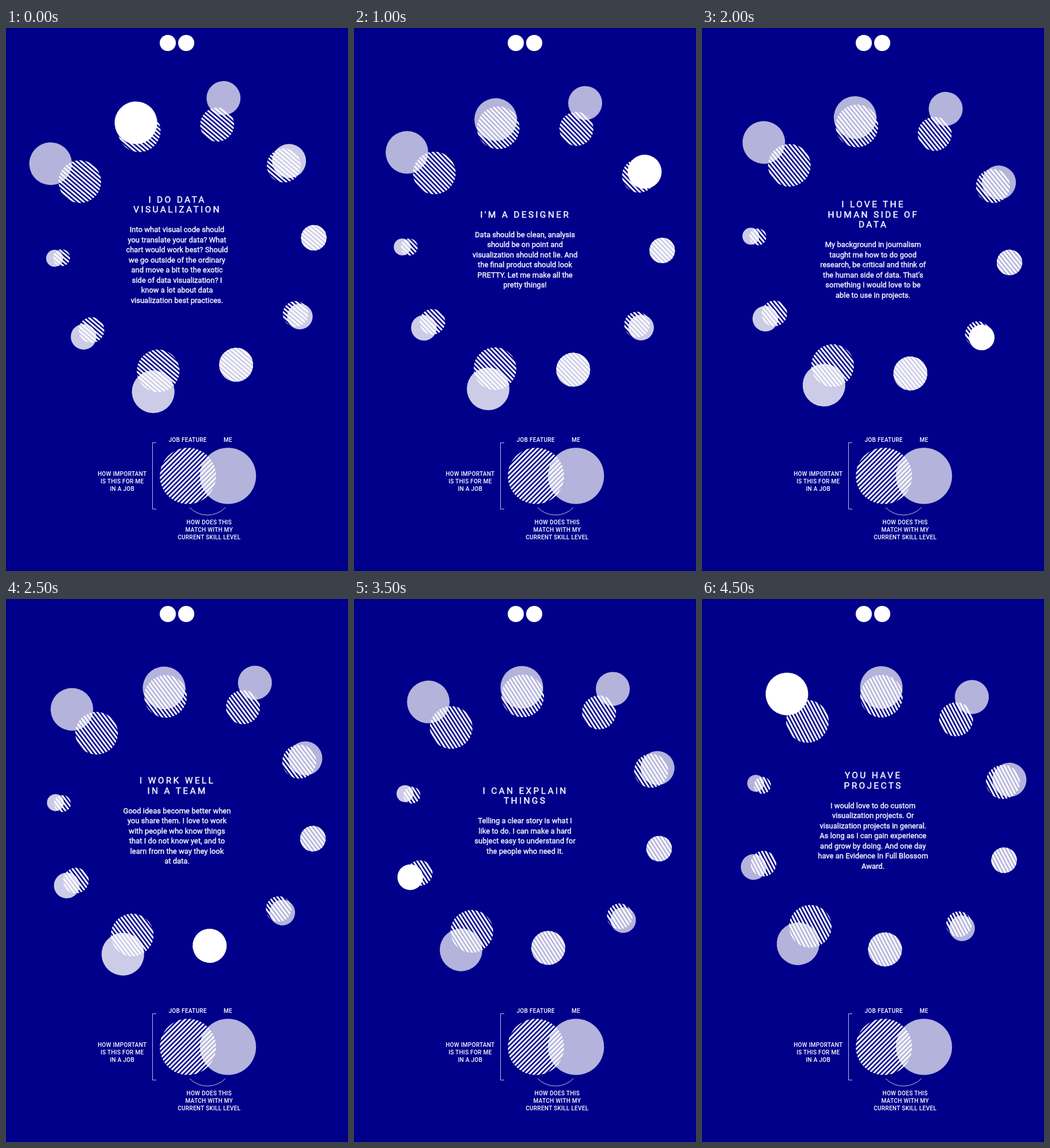
An HTML page for the animation above (5 s loop, 594 px wide and 942 px high).

```html
<!DOCTYPE html>
<html lang="en">
<head>
<meta charset="utf-8">
<title>Job features</title>
<style>
  html, body { margin: 0; width: 100%; height: 100%; overflow: hidden; background: #00008b; }
  svg { display: block; width: 100%; height: 100%; }
  text { fill: #fff; font-family: Roboto, sans-serif; text-anchor: middle; }
  .title { font-size: 15.5px; letter-spacing: 3.3px; stroke: #fff; stroke-width: .4; }
  .body { font-size: 13px; stroke: #fff; stroke-width: .35; }
  .label { font-size: 10px; font-weight: 500; letter-spacing: .3px; }
  .thin { fill: none; stroke: #fff; stroke-opacity: .75; }
</style>
</head>
<body>
<svg id="stage" viewBox="0 0 594 942">
  <defs>
    <pattern id="stripes" y="-1.5" width="5.66" height="5.66" patternUnits="userSpaceOnUse" patternTransform="rotate(45)">
      <rect width="5.66" height="3" fill="#fff"/>
    </pattern>
    <pattern id="legendStripes" y="-1.5" width="5.66" height="5.66" patternUnits="userSpaceOnUse" patternTransform="rotate(-45)">
      <rect width="5.66" height="3" fill="#fff"/>
    </pattern>
  </defs>
  <rect width="594" height="942" fill="#00008b"/>
  <circle cx="281" cy="26" r="14" fill="#fff"/>
  <circle cx="313" cy="26" r="14" fill="#fff"/>
  <g id="wheel"></g>
  <g id="story"></g>
  <g id="legend">
    <circle cx="316" cy="777" r="48.8" fill="url(#legendStripes)"/>
    <circle cx="385.5" cy="777" r="48.8" fill="#fff" fill-opacity=".7"/>
    <path class="thin" d="M261 719.5H254.5V834.5H261"/>
    <path class="thin" d="M319 832A43.5 43.5 0 0 0 381 832"/>
  </g>
</svg>
<script>
const STEP = 500, LINE = 17.5, RING = 219.7;
const PIVOT = { x: 296.8, y: 382.7 }, SHIFT = 18.8;

// wheel angle at each step, in degrees
const angles = [-4.52, -1.85, 0.77, 3.34, 5.8, 7.97, 10.11, 12.2, 14.32, 17.19];

// [circle radius, distance of the solid circle from the wheel centre]
const features = [
  [37, 279.2], [37, 234.7], [29.5, 267], [29.5, 231.6], [22.2, 219.7],
  [22.2, 228.5], [29.5, 219.7], [37, 256.8], [22.2, 237.8], [14.7, 231.8]
];

// title and body; "|" separates lines
const stories = [
  ["I DO DATA|VISUALIZATION",
   "Into what visual code should|you translate your data? What|chart would work best? Should|we go outside of the ordinary|and move a bit to the exotic|side of data visualization? I|know a lot about data|visualization best practices."],
  ["I LIKE TO|CODE",
   "Building things that work in|the browser is a lot of fun.|I am still learning, but every|project teaches me how to do|it a little bit better."],
  ["I'M A DESIGNER",
   "Data should be clean, analysis|should be on point and|visualization should not lie. And|the final product should look|PRETTY. Let me make all the|pretty things!"],
  ["WE ARE BOTH|FLEXIBLE",
   "I have really found what I love.|So much so that I don’t mind|doing it in my free time. On the|contrary: I don’t even notice|hours passing by while I do it.|But sometimes, it’s just not|working (literally and|figuratively) so it’s nice to know|in those moments that you can|just put it aside for a minute|and go for a workout or grocery|shopping."],
  ["I LOVE THE|HUMAN SIDE OF|DATA",
   "My background in journalism|taught me how to do good|research, be critical and think of|the human side of data. That’s|something I would love to be|able to use in projects."],
  ["I WORK WELL|IN A TEAM",
   "Good ideas become better when|you share them. I love to work|with people who know things|that I do not know yet, and to|learn from the way they look|at data."],
  ["I ALWAYS WANT|TO LEARN NEW|THINGS",
   "I went from design, to|journalism, to data, to coding.|Not because I can’t choose, but|because I love the flexibility!"],
  ["I CAN EXPLAIN|THINGS",
   "Telling a clear story is what I|like to do. I can make a hard|subject easy to understand for|the people who need it."],
  ["I HAVE AN|ANALYTICAL|MINDSET",
   "My passion lies in visualizing,|but for me that doesn’t mean|that I want to be the one that|swoops in at the end of a|project. I love to be involved in|the analysis phase."],
  ["YOU HAVE|PROJECTS",
   "I would love to do custom|visualization projects. Or|visualization projects in general.|As long as I can gain experience|and grow by doing. And one day|have an Evidence In Full Blossom|Award."]
];

const $ = id => document.getElementById(id);

function add(parent, tag, attrs, text) {
  const el = document.createElementNS("http://www.w3.org/2000/svg", tag);
  for (const key in attrs) el.setAttribute(key, attrs[key]);
  if (text) el.textContent = text;
  return parent.appendChild(el);
}

function addLines(parent, cls, x, y, gap, lines) {
  lines.forEach((line, i) => add(parent, "text", { class: cls, x, y: y + i * gap }, line));
}

const solids = features.map(([r, distance], i) => {
  const a = (i - 4) * Math.PI / 5;
  const disc = (d, fill) =>
    add($("wheel"), "circle", { cx: d * Math.cos(a), cy: d * Math.sin(a), r, fill });
  disc(RING, "url(#stripes)");
  return disc(distance, "#fff");
});

const panels = stories.map(([title, body]) => {
  const panel = add($("story"), "g", {});
  const head = title.split("|"), rows = body.split("|");
  const top = 302.5 + (10 - head.length - rows.length) * LINE / 2;
  addLines(panel, "title", 297.6, top, LINE, head);
  addLines(panel, "body", 297, top + (head.length + 1) * LINE - .8, LINE, rows);
  return panel;
});

addLines($("legend"), "label", 315.6, 717.6, 13, ["JOB FEATURE"]);
addLines($("legend"), "label", 385.4, 717.6, 13, ["ME"]);
addLines($("legend"), "label", 201.8, 777.2, 13, ["HOW IMPORTANT", "IS THIS FOR ME", "IN A JOB"]);
addLines($("legend"), "label", 352.8, 860.7, 13, ["HOW DOES THIS", "MATCH WITH MY", "CURRENT SKILL LEVEL"]);

function draw(ms) {
  const step = Math.floor(ms / STEP) % stories.length;
  const active = (step + 1) % features.length;
  const seen = Math.max(2, step + 1);
  $("wheel").setAttribute("transform",
    `translate(${PIVOT.x} ${PIVOT.y}) rotate(${angles[step]}) translate(${SHIFT} 0)`);
  solids.forEach((solid, i) =>
    solid.setAttribute("fill-opacity", i === active ? 1 : i <= seen ? .7 : .8));
  panels.forEach((panel, i) => panel.setAttribute("display", i === step ? "inline" : "none"));
}

const start = performance.now();
function tick() {
  draw(performance.now() - start);
  requestAnimationFrame(tick);
}
tick();
</script>
</body>
</html>
```
